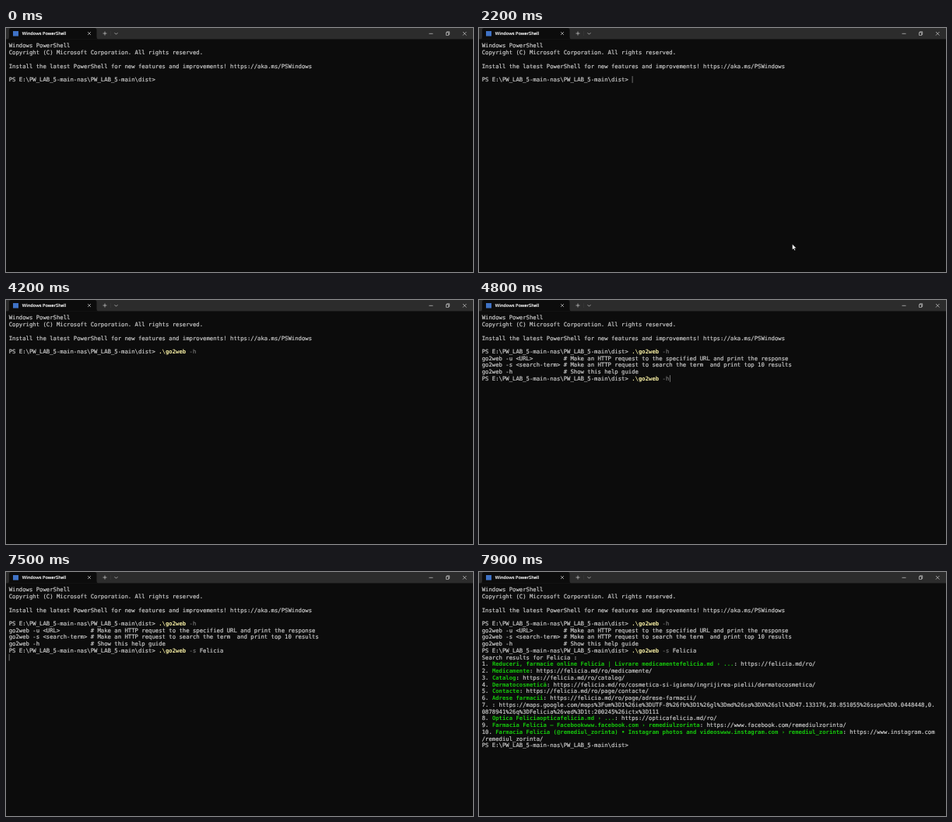
Animation of 600x315 px, one loop 8 s. Source, as an HTML page:

```html
<!DOCTYPE html>
<html lang="en">
<head>
<meta charset="utf-8">
<title>Terminal session</title>
<style>
  html, body { margin: 0; width: 100%; height: 100%; overflow: hidden; background: #0c0c0c; }
  svg { display: block; width: 600px; height: 315px; }
  text { white-space: pre; text-rendering: geometricPrecision; }
  .mono { font: 7.285px "DejaVu Sans Mono", monospace; }
  .mono tspan { color: #ccc; fill: currentColor; stroke: currentColor; stroke-width: .18; }
  .mono .cmd { color: #f9f1a5; font-weight: bold; stroke: none; }
  .mono .opt { color: #767676; }
  .mono .hit { color: #16c60c; font-weight: bold; stroke: none; }
  .tab { font: 600 5.65px "Open Sans", "Noto Sans", sans-serif; fill: #fff; stroke: #fff; stroke-width: .12; }
  .icon { fill: none; stroke: #e6e6e6; stroke-width: .6; }
</style>
</head>
<body>
<svg viewBox="0 0 600 315">
  <rect width="600" height="315" fill="#0c0c0c"/>
  <rect width="600" height="14.400" fill="#2c2c2c"/>
  <path d="M2 14.400Q4 14.400 4 12V2.500Q4 0 6.500 0H114Q116.500 0 116.500 2.500V12Q116.500 14.400 118.500 14.400Z" fill="#0c0c0c"/>
  <rect x="9" y="4" width="7" height="6.500" fill="#3f72c6"/>
  <text class="tab" x="20.800" y="9.200">Windows PowerShell</text>
  <path class="icon" d="M105 5l4 4m0-4l-4 4M124.500 7h5m-2.500-2.500v5M139.500 6.200l2 2l2-2
    M543.500 7.300h5M565.500 5.800h3.200v3.600h-3.200zM566.500 5.800v-1h3.200v3.600h-1M587 5l4.500 4.500m0-4.500l-4.500 4.500"/>
  <path d="M134.500 4v6" stroke="#3c3c3c" stroke-width=".5"/>
  <g id="screen"></g>
  <rect id="caret" width=".7" height="8.750" fill="#999"/>
  <path id="mouse" d="M0 0V7.300L1.700 5.800L2.800 8.300L4 7.800L2.900 5.300H5.200Z" fill="#fff" stroke="#000" stroke-width=".4"/>
</svg>
<script>
const LOOP = 8000, CELL = 4.386, LINE = 8.74, LEFT = 3.75, TOP = 18.4;
const NS = 'http://www.w3.org/2000/svg';
const [screen, caret, mouse] = ['screen', 'caret', 'mouse'].map(id => document.getElementById(id));
const PROMPT = 'PS E:\\PW_LAB_5-main-nas\\PW_LAB_5-main\\dist> ';
const EXE = '.\\go2web';

function node(tag, attrs, parent) {
  const el = document.createElementNS(NS, tag);
  for (const key in attrs) el.setAttribute(key, attrs[key]);
  return parent.appendChild(el);
}

// A row is a list of strings or [class, string] runs.
function addRow(row, ...runs) {
  const line = node('text', { class: 'mono', x: LEFT, y: TOP + row * LINE + 6.9 }, screen);
  return runs.map(run => {
    const [cls, str] = Array.isArray(run) ? run : ['', run];
    const span = node('tspan', { class: cls }, line);
    span.textContent = str;
    return span;
  });
}

function addGroup(firstRow, rows) {
  return rows.flatMap((runs, i) => addRow(firstRow + i, ...runs));
}

const hit = (n, title, url) => [`${n}. `, ['hit', title], `: ${url}`];
const user = 'remediul_zorinta', page = 'remediulzorinta';

addGroup(0, [
  ['Windows PowerShell'],
  ['Copyright (C) Microsoft Corporation. All rights reserved.'],
  [],
  ['Install the latest PowerShell for new features and improvements! https://aka.ms/PSWindows']
]);

const prompts = [5, 9].map(row => addRow(row, PROMPT, ['cmd', ''], ['opt', ''], ''));

const help = addGroup(6, [
  ['go2web -u <URL>         # Make an HTTP request to the specified URL and print the response'],
  ['go2web -s <search-term> # Make an HTTP request to search the term  and print top 10 results'],
  ['go2web -h               # Show this help guide']
]);

const results = addGroup(10, [
  ['Search results for Felicia :'],
  hit(1, 'Reduceri, farmacie online Felicia | Livrare medicamentefelicia.md › ...', 'https://felicia.md/ro/'),
  hit(2, 'Medicamente', 'https://felicia.md/ro/medicamente/'),
  hit(3, 'Catalog', 'https://felicia.md/ro/catalog/'),
  hit(4, 'Dermatocosmetică', 'https://felicia.md/ro/cosmetica-si-igiena/ingrijirea-pielii/dermatocosmetica/'),
  hit(5, 'Contacte', 'https://felicia.md/ro/page/contacte/'),
  hit(6, 'Adrese farmacii', 'https://felicia.md/ro/page/adrese-farmacii/'),
  ['7. : https://maps.google.com/maps%3Fum%3D1%26ie%3DUTF-8%26fb%3D1%26gl%3Dmd%26sa%3DX%26sll%3D47.133176,28.851055%26sspn%3D0.0448448,0.'],
  ['0878941%26q%3DFelicia%26ved%3D1t:200245%26ictx%3D111'],
  hit(8, 'Optica Feliciaopticafelicia.md › ...', 'https://opticafelicia.md/ro/'),
  hit(9, `Farmacia Felicia – Facebookwww.facebook.com › ${page}`, `https://www.facebook.com/${page}/`),
  hit(10, `Farmacia Felicia (@${user}) • Instagram photos and videoswww.instagram.com › ${user}`, 'https://www.instagram.com'),
  [`/${user}/`],
  [PROMPT]
]);

// Latest value whose start time has passed; steps are [start, value].
const at = (steps, t) => steps.findLast(([start]) => start <= t)[1];

const firstInput = [[0, ''], [2700, EXE + ' -h']];
const secondInput = [
  [0, ''], [4700, EXE + ' -h'], [4900, EXE + ' -'], [5000, EXE + ' -s'],
  [5100, EXE + ' -s F'], [5200, EXE + ' -s Fel'], [5300, EXE + ' -s Felic'], [5400, EXE + ' -s Felicia']
];
const caretRow = [[0, 5], [3300, 6], [4300, 9], [5600, 10], [7600, 23]];
// The caret flips at each of these times, starting hidden.
const flips = [400, 700, 900, 1200, 1500, 1800, 2200, 2400, 2700, 3000, 3300, 3500, 3800, 4100,
  4300, 4600, 4700, 5900, 6100, 6400, 6600, 6900, 7100, 7900];
const path = [[400, 409, 303], [1300, 406, 293], [1500, 406, 293], [1800, 402.5, 279], [3300, 402.5, 279]];

function setInput([, cmd, opt, arg], input) {
  const [exe, flag, term] = input.split(' ');
  cmd.textContent = exe;
  opt.textContent = flag ? ' ' + flag : '';
  arg.textContent = term ? ' ' + term : '';
}

const show = (el, on) => el.setAttribute('visibility', on ? 'visible' : 'hidden');

function moveMouse(t) {
  const i = path.findIndex(([time]) => time > t);
  show(mouse, i > 0);
  if (i < 1) return;
  const [t0, x0, y0] = path[i - 1], [t1, x1, y1] = path[i];
  const k = (t - t0) / (t1 - t0);
  mouse.setAttribute('transform', `translate(${x0 + (x1 - x0) * k} ${y0 + (y1 - y0) * k})`);
}

function draw(now) {
  const t = Math.floor(now % LOOP / 100) * 100;
  const inputs = [at(firstInput, t), at(secondInput, t)];
  prompts.forEach((spans, i) => setInput(spans, inputs[i]));
  show(prompts[1][0].parentNode, t >= 4300);
  help.forEach(el => show(el, t >= 4300));
  results.forEach(el => show(el, t >= 7600));

  const row = at(caretRow, t);
  const columns = { 5: PROMPT.length + inputs[0].length, 9: PROMPT.length + inputs[1].length, 23: PROMPT.length };
  caret.setAttribute('x', LEFT + (columns[row] || 0) * CELL);
  caret.setAttribute('y', TOP + row * LINE);
  show(caret, flips.filter(time => time <= t).length % 2);
  moveMouse(t);
  requestAnimationFrame(() => draw(performance.now()));
}
draw(performance.now());
</script>
</body>
</html>
```
